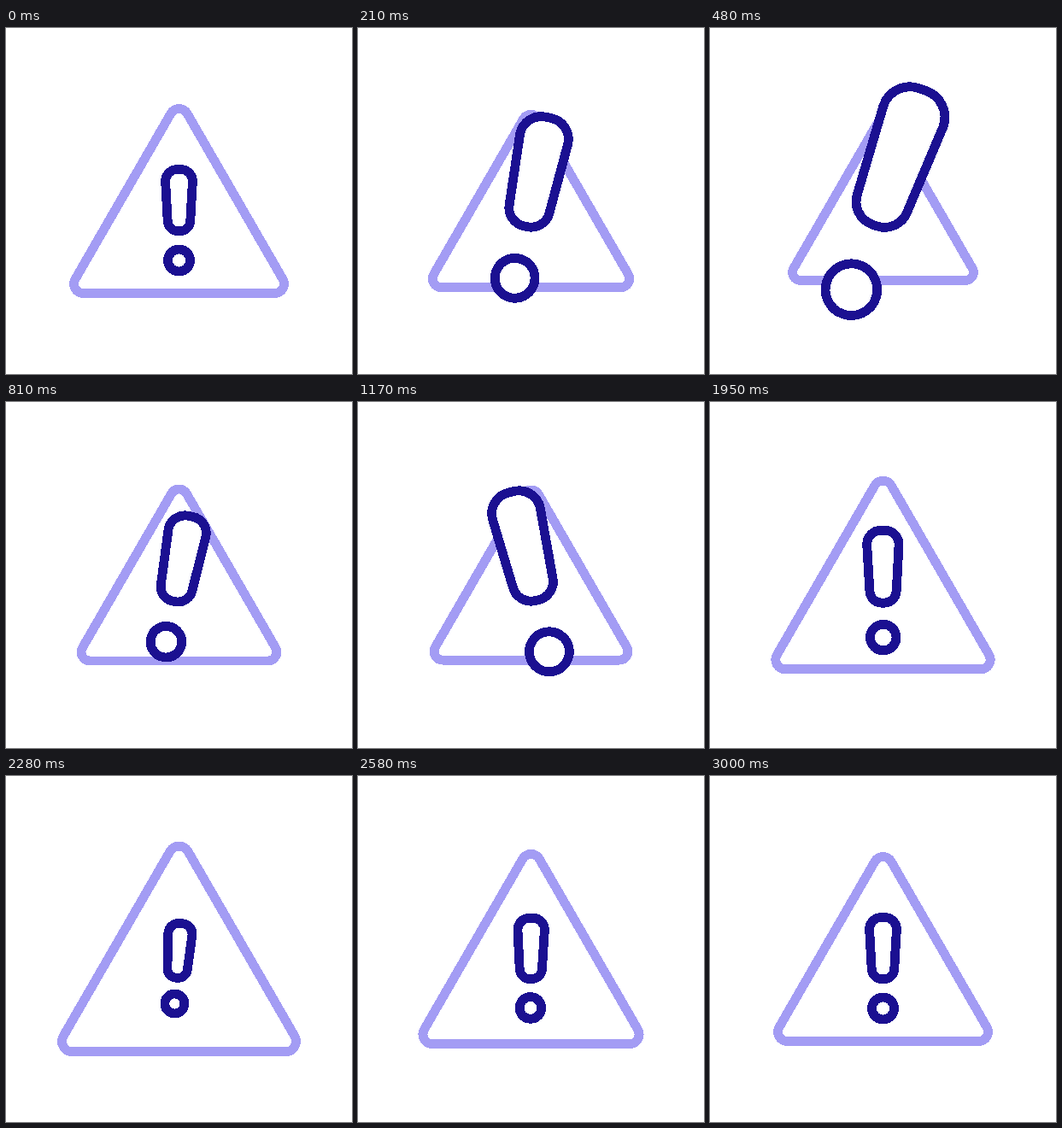
Write an HTML page that moves like this. It is 405x405 px and loops after 3030 ms.

```html
<!DOCTYPE html>
<html lang="en">
<head>
<meta charset="utf-8">
<title>Warning icon</title>
<style>
html, body { margin: 0; width: 100%; height: 100%; overflow: hidden; background: #fff; }
svg { display: block; width: 100vw; height: 100vh; shape-rendering: crispEdges; }
path, circle { fill: #fff; stroke-width: 10.8; vector-effect: non-scaling-stroke; }
#sign { stroke: #a39cf4; }
#mark { stroke: #1b1091; }
</style>
</head>
<body>
<svg viewBox="0 0 405 405">
  <path id="sign" d="M90.5 310.5H314.5A11 11 0 0 0 324 294L212 100A11 11 0 0 0 193 100L81 294A11 11 0 0 0 90.5 310.5Z"/>
  <g id="mark">
    <path d="M186.6 179.5a14 14 0 0 1 14-14h3.8a14 14 0 0 1 14 14l-2.6 46a12.2 12.2 0 0 1-12.2 12.2h-2.2a12.2 12.2 0 0 1-12.2-12.2z"/>
    <circle cx="202.5" cy="272" r="13"/>
  </g>
</svg>
<script>
const LOOP = 3030, STEP = 30, CENTER = 202.5, MARK_Y = 225.7;
const LEAN = 450, SWING = 1620, BACK = 2190, REST = 2760;
const sign = document.getElementById('sign');
const mark = document.getElementById('mark');

// Cubic Bezier easing with handles (x1, 0) and (x2, 1), solved by bisection.
const bezier = (x1, x2) => t => {
  let lo = 0, hi = 1, u;
  for (let i = 0; i < 20; i++) {
    u = (lo + hi) / 2;
    const v = 1 - u;
    if (3 * u * v * v * x1 + 3 * u * u * v * x2 + u ** 3 < t) lo = u; else hi = u;
  }
  return u * u * (3 - 2 * u);
};
const smooth = t => t * t * (3 - 2 * t);
const snappy = bezier(.5, .3);

// Sum of eased moves: each one shifts the value by a difference over its span.
const move = (time, start, end, by, ease) =>
  by * ease(Math.min(1, Math.max(0, (time - start) / (end - start))));

// Swells to `lean` twice, relaxing at `midTime`, then overshoots and settles at 1.
const swell = (time, lean, mid, midTime, over, ease) =>
  1 + move(time, 0, LEAN, lean - 1, ease) +
  move(time, LEAN, midTime, mid - lean, ease) +
  move(time, midTime, SWING, lean - mid, ease) +
  move(time, SWING, BACK, over - lean, ease) +
  move(time, BACK, REST, 1 - over, ease);

// Tilts right, left, slightly right again, then upright.
const tilt = (time, angle, over) =>
  move(time, 0, LEAN, angle, snappy) -
  move(time, LEAN, SWING, 2 * angle, snappy) +
  move(time, SWING, BACK, angle + over, snappy) -
  move(time, BACK, REST, over, snappy);

function draw(now) {
  const time = Math.floor(now % LOOP / STEP) * STEP;
  const signScale = swell(time, .86, .945, 940, 1.122, smooth);
  const markScale = swell(time, 2.34, 1.39, 870, .88, snappy);
  const lift = 17 * Math.max(0, markScale - 1) ** .75;
  sign.setAttribute('transform',
    `translate(${CENTER} ${CENTER}) scale(${signScale}) translate(${-CENTER} ${-CENTER})`);
  mark.setAttribute('transform',
    `rotate(${tilt(time, 19.7, 4.8)} ${CENTER} ${CENTER}) translate(${CENTER} ${MARK_Y - lift}) ` +
    `scale(${markScale}) translate(${-CENTER} ${-MARK_Y})`);
}

const begin = performance.now();
function tick() {
  draw(performance.now() - begin);
  requestAnimationFrame(tick);
}
tick();
</script>
</body>
</html>
```
